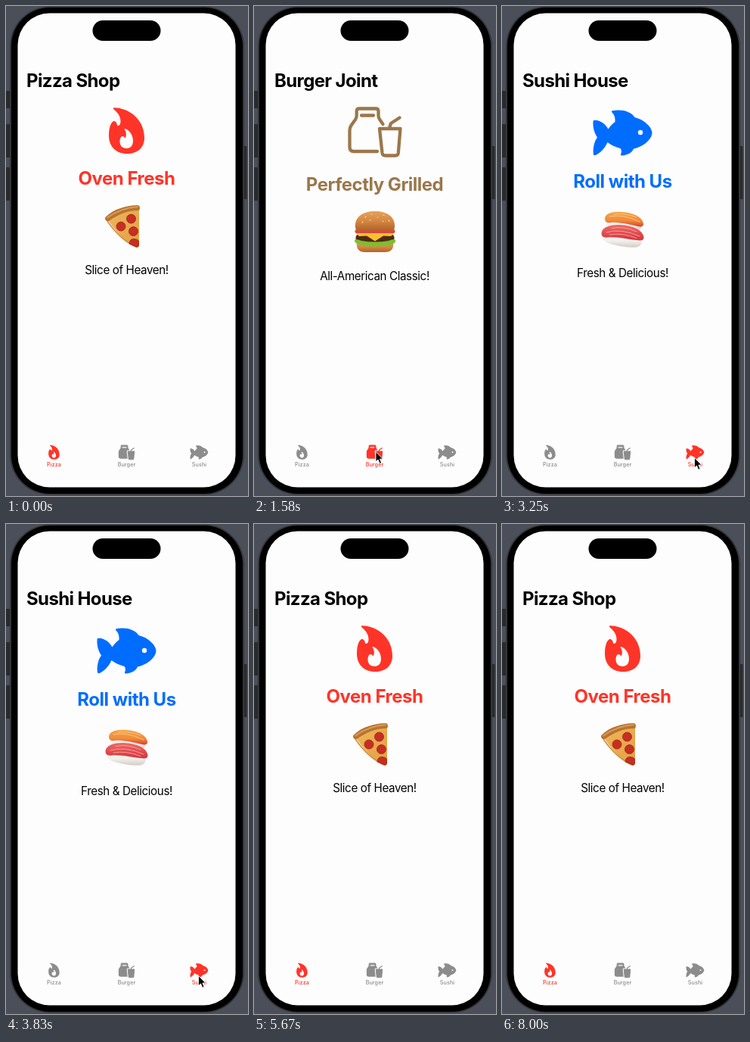
An HTML page for the animation above (8080 ms loop, 320x647 px).

```html
<!DOCTYPE html>
<html lang="en">
<head>
<meta charset="utf-8">
<title>Food tabs</title>
<style>
  html, body { margin: 0; width: 100%; height: 100%; overflow: hidden; background: #4a4f59; }
  svg { display: block; width: 320px; height: 647px; font-family: Inter, Roboto, sans-serif; }
  .title, .head { font-size: 24px; font-weight: 700; letter-spacing: -.62px; }
  .head, .sub, .tab text { text-anchor: middle; }
  .head { fill: currentColor; letter-spacing: -.5px; }
  .sub { font-size: 15.2px; letter-spacing: -.4px; }
  .tab { color: #8c8c8c; fill: currentColor; }
  .tab.on { color: #ff3428; }
  .tab text { font-size: 7.2px; font-weight: 500; letter-spacing: .1px; }
  .page { visibility: hidden; }
  .page.on { visibility: visible; }
</style>
</head>
<body>
<svg viewBox="0 0 320 647">
  <defs>
    <linearGradient id="bun" x2="0" y2="1">
      <stop stop-color="#e5a25a"/><stop offset=".5" stop-color="#d58842"/><stop offset="1" stop-color="#b0632a"/>
    </linearGradient>
    <linearGradient id="cheese" x2="1" y2="1">
      <stop stop-color="#efb659"/><stop offset="1" stop-color="#e2a044"/>
    </linearGradient>
    <linearGradient id="salmon" x2="0" y2="1">
      <stop stop-color="#f7a548"/><stop offset=".6" stop-color="#f08a3c"/><stop offset="1" stop-color="#dd3f2c"/>
    </linearGradient>
    <linearGradient id="tuna" x2="0" y2="1">
      <stop stop-color="#ee6a68"/><stop offset="1" stop-color="#d5343c"/>
    </linearGradient>
    <linearGradient id="rice" x2="0" y2="1">
      <stop offset=".5" stop-color="#f3f0ec"/><stop offset="1" stop-color="#d3cdc6"/>
    </linearGradient>
    <g id="flame">
      <path fill="currentColor" d="M143 134.200C159 134 183 147 183 174C183 187 174 195 160 195C145 195 136 185 136 171C136 161 138.500 154.500 141.500 152.500C144.500 151 146.500 154 147 157.500C150 159 151.500 156 151.500 152C151.500 145 146.500 139.500 142.500 136.500C141.300 135.400 141.800 134.200 143 134.200Z"/>
      <path fill="#fdfdfd" d="M157.500 162C164 164.500 168 171 168 178C168 184.500 164.500 188 159.500 188C153.500 188 150.500 184 150.500 179C150.500 175 152 172 154 172C155.500 172 156.500 173 157.500 174.500C159.800 171 159 166.500 157 163.500C156.400 162.500 156.800 161.800 157.500 162Z"/>
    </g>
    <path id="bag" d="M163 192H132Q126.500 192 126.500 186V164Q126.500 160 129 157L134 150Q135.700 147.500 135.700 144.500V139Q135.700 135.500 139 135.500H161Q164.500 135.500 164.500 139V144.500Q164.500 147.500 166.300 150L170.500 156"/>
    <path id="cup" d="M166 162H193.500L190.800 194Q190.400 197.500 187 197.500H173.500Q170 197.500 169.500 194Z"/>
    <path id="straw" d="M179 161L181 155L192.500 147.500"/>
    <g id="meal" fill="none" stroke="currentColor" stroke-width="4.300" stroke-linecap="round" stroke-linejoin="round">
      <use href="#bag"/><path d="M142 144.500H158"/><use href="#cup"/><use href="#straw"/>
    </g>
    <g id="mealFill" stroke-linecap="round" stroke-linejoin="round" stroke-width="4">
      <use href="#bag" fill="currentColor" stroke="currentColor"/>
      <path d="M165 192V156H170" fill="currentColor" stroke="currentColor"/>
      <path d="M142 144.500H158" stroke="#fdfdfd"/>
      <g fill="#fdfdfd" stroke="#fdfdfd" stroke-width="11"><use href="#cup"/></g>
      <g fill="currentColor" stroke="currentColor"><use href="#cup"/><use href="#straw" fill="none"/></g>
    </g>
    <g id="fish">
      <path fill="currentColor" d="M198.500 167.500C198 176 187 186 174 188.500C172 193.500 166 197 158.500 197.500C157 197.500 156.500 196.500 157.200 195.300C158.500 192.500 158 190 156.500 188C150 186.500 144 183.500 139.500 180C136.500 187 130.500 194 123.500 197C122 197.500 121 196.800 120.800 195C120.200 187 122 179 126 173.500C122 167.500 120 160 120.500 153C120.600 151.200 121.200 150.500 123 150.700C130.500 151 137 156 140.500 162.500C143 158.500 146 155.500 149.500 153C150 147.500 148.500 143.500 145.500 140.500C144.500 139.300 144.800 138.500 146.300 138.200C158 136 170.500 139 175.500 147C188 150 198 159.500 198.500 167.500Z"/>
      <circle cx="183" cy="167" r="3.200" fill="#fdfdfd"/>
    </g>
  </defs>

  <!-- phone -->
  <g fill="#292b2e">
    <path d="M0 112H5V135H0ZM0 156H5V200H0ZM0 213H5V257H0ZM314 185H318.500V255H314Z"/>
    <rect x="5" y=".5" width="310" height="645" rx="53" fill="#35373a"/>
    <rect x="7" y="2" width="306" height="642" rx="51" fill="#000"/>
    <rect x="15.500" y="9.500" width="288" height="626" rx="42" fill="#fdfdfd"/>
    <rect x="114.500" y="19" width="90" height="27" rx="13.500" fill="#000"/>
  </g>

  <g class="page" color="#ff3428">
    <text class="title" x="27" y="107">Pizza Shop</text>
    <use href="#flame"/>
    <text class="head" x="159.500" y="236">Oven Fresh</text>
    <path fill="url(#cheese)" d="M134 281Q153 268 176 268L176 317Q175 320 172 318.500Q152 309 134 281Z"/>
    <path fill="none" stroke="#d08a3c" stroke-width="1.500" d="M134 284Q151 309 173 318.500"/>
    <path fill="#b87432" d="M131.300 279C142 268 160 263 174 263Q177 263 177 267Q177 270 174 270C160 270 147 276 136 284Q133 285 131.500 282.500Q130.500 280.500 131.300 279Z"/>
    <path fill="none" stroke="#d79b55" stroke-width="2" stroke-linecap="round" d="M134 279.500Q152 266.500 174 265"/>
    <g fill="#c62f22" stroke="#9f2318" stroke-width=".8">
      <circle cx="165.500" cy="281" r="6"/><circle cx="152" cy="291" r="6"/><circle cx="168.500" cy="297.500" r="6"/>
      <path d="M163 314Q163 308 169 307.500Q173 307.500 175.500 310V316.500Q174 319 171.500 317.700Z"/>
    </g>
    <text class="sub" x="159.500" y="354">Slice of Heaven!</text>
  </g>

  <g class="page" color="#9b774b">
    <text class="title" x="27" y="107">Burger Joint</text>
    <use href="#meal"/>
    <text class="head" x="159.500" y="244">Perfectly Grilled</text>
    <path fill="url(#bun)" d="M136 311H184Q186 325 173 325H147Q134 325 136 311Z"/>
    <rect x="134.500" y="301" width="51" height="11" rx="5" fill="#4f2a18"/>
    <path fill="#7cbf2f" d="M133 309Q136 307 142 310Q160 313 178 310Q184 307 187 309Q188 313 183 314Q178 319 173 315.500Q168 319 163 316Q157 320 152 316Q146 319 142 315Q132 314 133 309Z"/>
    <path fill="#fbbf2e" d="M134 299.500Q160 297.500 186 299.500L181 304L171 303.500L160 310.500L149 303.500L139 304Z"/>
    <rect x="133.500" y="295" width="53" height="5" rx="2.500" fill="#d94a38"/>
    <path fill="url(#bun)" d="M134 292C133 279 143 271 160 271C177 271 187 279 186 292Q186 296.500 181 296.500H139Q134 296.500 134 292Z"/>
    <path stroke="#f3d49a" stroke-width="1.200" stroke-linecap="round" d="M147 279l1-1M155 275l1 0M153 283l1-.5M163 279l1 0M171 276l1 .5M170 284l1 .5M178 283l1 1M143 286l1-1"/>
    <text class="sub" x="159.500" y="362.200">All-American Classic!</text>
  </g>

  <g class="page" color="#006dff">
    <text class="title" x="27" y="107">Sushi House</text>
    <use href="#fish"/>
    <text class="head" x="159.500" y="239.500">Roll with Us</text>
    <path fill="url(#rice)" d="M138 282Q160 280 184 288Q186 296 178 297L146 295Q137 291 138 282Z"/>
    <path fill="url(#salmon)" d="M136 281C136 274 146 271 159 272C174 273 187 279 187 288.500Q186 292.500 180 291C167 288 153 285 143 286Q136 287 136 281Z"/>
    <path fill="none" stroke="#fbc37c" stroke-width="1" stroke-linecap="round" d="M142 278Q160 274 182 285M148 275Q163 273 178 279"/>
    <path fill="url(#rice)" d="M133 301Q156 300 185 307Q186 317 178 318.500Q157 319.500 139 312.500Q132 309 133 301Z"/>
    <path fill="url(#tuna)" d="M131.500 301C131 293 141 289 153 289C170 289 186 295 187.500 305Q187.500 310 182 309.500C167 308.500 153 304.500 140 305.500Q132 306.500 131.500 301Z"/>
    <path fill="none" stroke="#f7a8a3" stroke-width=".9" stroke-linecap="round" d="M138 299Q157 293 182 304M145 293.500Q161 290 178 298M142 302Q159 299 178 306.500"/>
    <text class="sub" x="159.500" y="357.500">Fresh &amp; Delicious!</text>
  </g>

  <g class="tab"><use href="#flame" transform="translate(14 538.200) scale(.31)"/><text x="63.500" y="608">Pizza</text></g>
  <g class="tab"><use href="#mealFill" transform="translate(111.500 539.500) scale(.3)"/><text x="159.500" y="608">Burger</text></g>
  <g class="tab"><use href="#fish" transform="translate(206.700 538.200) scale(.305)"/><text x="255.500" y="608">Sushi</text></g>

  <path id="cursor" fill="#000" stroke="#fff" stroke-width=".9" stroke-linejoin="round" d="M0 0V13.300L3 10.500L5.200 15.800L7.600 14.800L5.400 9.600H9.500Z"/>
</svg>
<script>
  const LOOP = 8080;
  const pages = document.querySelectorAll('.page');
  const tabs = document.querySelectorAll('.tab');
  const cursor = document.getElementById('cursor');

  // [time, index]: the tab lights up one tick before its page appears
  const taps = [[0, 0], [1170, 1], [3170, 2], [5080, 0]];
  const PAGE_DELAY = 80;
  // [time, x, y]
  const path = [[500, 34, 575], [1000, 161, 588.5], [2550, 161, 588.5], [2670, 169.5, 589.5],
    [3130, 254.5, 596.5], [4330, 254.5, 596.5], [4950, 67, 597], [5580, 67, 597]];

  const selected = t => taps.filter(([at]) => at <= Math.max(t, 0)).pop()[1];
  const mark = (items, index) => items.forEach((el, i) => el.classList.toggle('on', i === index));

  function moveCursor(t) {
    const i = path.findIndex(([at]) => at > t);
    cursor.style.display = i > 0 ? '' : 'none';
    if (i < 1) return;
    const [t0, x0, y0] = path[i - 1], [t1, x1, y1] = path[i];
    const u = (t - t0) / (t1 - t0), k = u * u * (3 - 2 * u);
    cursor.setAttribute('transform', `translate(${x0 + (x1 - x0) * k} ${y0 + (y1 - y0) * k})`);
  }

  const start = performance.now();
  function draw() {
    const t = (performance.now() - start) % LOOP;
    mark(tabs, selected(t));
    mark(pages, selected(t - PAGE_DELAY));
    moveCursor(t);
    requestAnimationFrame(draw);
  }
  draw();
</script>
</body>
</html>
```
